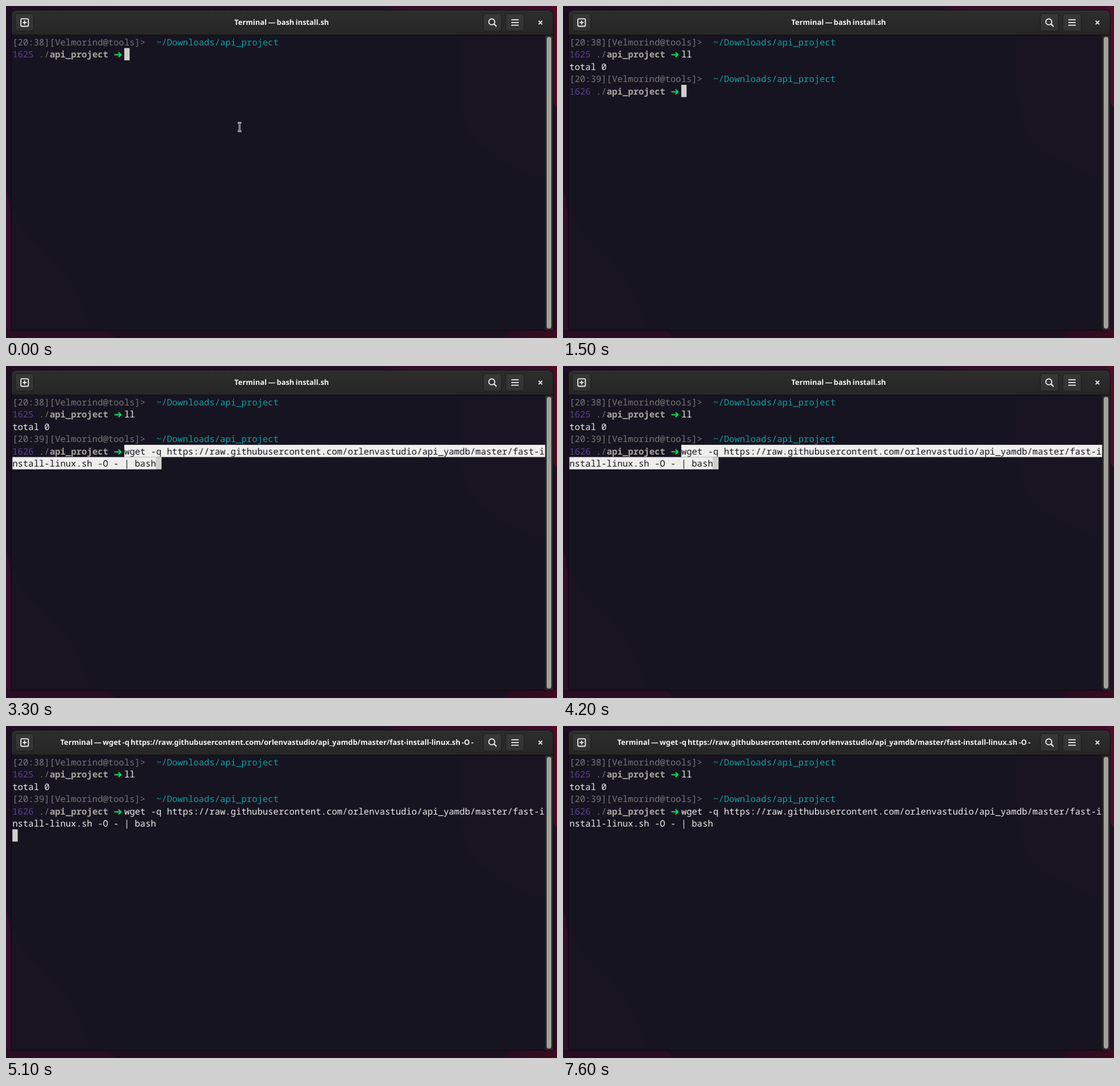
Write an HTML page that moves like this. It is 964 px wide and 581 px high and loops after 8000 ms.

```html
<!DOCTYPE html>
<html lang="en">
<head>
<meta charset="utf-8">
<title>Terminal</title>
<style>
  html, body { margin: 0; width: 100%; height: 100%; overflow: hidden; background: #190f1f; }
  svg { display: block; width: 964px; height: 581px; }
  text { white-space: pre; text-rendering: geometricPrecision; }
  #screen text { font: 15.53px "Noto Sans Mono", "DejaVu Sans Mono", monospace; }
  #screen text.bold { font-weight: bold; }
  #screen text.arrow { font: bold 18.3px "DejaVu Sans", sans-serif; }
  #title { font: bold 12.87px "Noto Sans", "Open Sans", sans-serif; word-spacing: -1.1px; }
</style>
</head>
<body>
<svg viewBox="0 0 964 581">
  <defs>
    <linearGradient id="header" x2="0" y2="1">
      <stop stop-color="#2d2d2d"/><stop offset="1" stop-color="#262626"/>
    </linearGradient>
    <linearGradient id="button" x2="0" y2="1">
      <stop stop-color="#383838"/><stop offset="1" stop-color="#323232"/>
    </linearGradient>
    <linearGradient id="topEdge">
      <stop stop-color="#1f0e22"/><stop offset=".68" stop-color="#210f24"/>
      <stop offset=".72" stop-color="#340e26"/><stop offset="1" stop-color="#3c0d26"/>
    </linearGradient>
    <linearGradient id="bottomEdge">
      <stop stop-color="#260c1e"/><stop offset="1" stop-color="#3c0b20"/>
    </linearGradient>
  </defs>

  <!-- wallpaper -->
  <rect width="964" height="581" fill="#190f1f"/>
  <rect width="964" height="10" fill="url(#topEdge)"/>
  <rect x="955" width="9" height="581" fill="#270e21"/>
  <path d="M955 0H964V178L955 166Z" fill="#4e0c23"/>
  <path d="M0 320Q14 350 14 581H0Z" fill="#330e27"/>
  <path d="M0 566H180L192 581H0Z" fill="#290d22"/>
  <path d="M870 581L880 566H964V581Z" fill="url(#bottomEdge)"/>

  <!-- window -->
  <path d="M9.500 567.500V16Q9.500 7.500 18 7.500H949Q957.500 7.500 957.500 16V567.500Z" fill="#171421" stroke="#0c090f"/>
  <path d="M795 52Q788 190 812 224Q850 270 943 303V52Z" fill="#191421"/>
  <path d="M10 352Q25 395 66 428Q128 480 148 567H10Z" fill="#181421"/>
  <path d="M10 51V16Q10 8 18 8H949Q957 8 957 16V51Z" fill="url(#header)"/>
  <path d="M17 8.500H950" stroke="#383838"/>
  <path d="M10 50.800H957" stroke="#0c0c0d"/>
  <rect x="943.500" y="51.500" width="13.500" height="515.500" fill="#2a2c2c"/>
  <rect x="946" y="54" width="8" height="510.500" rx="4" fill="#a3a19d"/>

  <!-- header buttons -->
  <g fill="url(#button)" stroke="#1a1a1a">
    <rect x="16.500" y="13.500" width="32" height="30.500" rx="4.500"/>
    <rect x="835" y="13.500" width="32" height="30.500" rx="4.500"/>
    <rect x="874.500" y="13.500" width="32" height="30.500" rx="4.500"/>
  </g>
  <g fill="none" stroke="#f0f0ee" stroke-width="1.800">
    <rect x="26" y="22.300" width="13.200" height="13.200" rx="2"/>
    <path d="M32.600 25.300V32.500M29 28.900H36.200"/>
    <circle cx="849.900" cy="27.700" r="5.200"/>
    <path d="M853.600 31.400L858.200 36" stroke-width="2.300"/>
    <path d="M884 24.100H897M884 28.900H897M884 33.700H897"/>
    <path d="M931.900 25.900L938.100 32.100M938.100 25.900L931.900 32.100" stroke-width="2"/>
  </g>
  <text id="title" y="33.300" fill="#f4f4f2"></text>

  <g id="screen"></g>
  <g id="pointer" fill="none">
    <path d="M405.500 204.500H407.500L408.700 205.500L409.900 204.500H411.900M408.700 205.500V218M405.500 219H407.500L408.700 218L409.900 219H411.900" stroke="#f2f2f2" stroke-width="2.800"/>
    <path d="M405.700 204.500H407.500L408.700 205.500L409.900 204.500H411.700M408.700 205.500V218M405.700 219H407.500L408.700 218L409.900 219H411.700" stroke="#17171b" stroke-width="1"/>
  </g>
</svg>
<script>
const LOOP = 8000;
const LEFT = 11.2, TOP = 52.2, CELL_W = 9.32, CELL_H = 21.436, ASCENT = 16.8;
const WHITE = "#eeeeec", DARK = "#171421", DIM = "#777577", CURSOR = "#d0cfcc";
const PROMPT_END = 21;
const SCRIPT = "wget -q https://raw.githubusercontent.com/orlenvastudio/api_yamdb/master/fast-install-linux.sh -O -";
const COMMAND = SCRIPT + " | bash";
const WRAP = 100 - PROMPT_END;

const TITLES = [
  { text: "Terminal — bash install.sh", x: 399.5 },
  { text: "Terminal — " + SCRIPT, x: 95 }
];

// Cursor positions by time; each one restarts the blink.
const CURSOR_STOPS = [
  { at: 0, col: 21, row: 1, flips: [200, 800] },
  { at: 900, col: 22, row: 1, flips: [] },
  { at: 1100, col: 23, row: 1, flips: [] },
  { at: 1500, col: 21, row: 4, flips: [2100, 2800] },
  { at: 3300, col: 27, row: 5, flips: [3600, 4200] },
  { at: 4600, col: 0, row: 6, flips: [5200, 5800, 6400, 7000, 7600] }
];

const screen = document.getElementById("screen");
const title = document.getElementById("title");
const pointer = document.getElementById("pointer");

function add(tag, attrs, parent = screen) {
  const node = document.createElementNS("http://www.w3.org/2000/svg", tag);
  for (const key in attrs) node.setAttribute(key, attrs[key]);
  return parent.appendChild(node);
}

const colX = col => LEFT + col * CELL_W;
const rowY = row => TOP + row * CELL_H;

function write(col, row, text, fill, style = "", parent = screen) {
  const node = add("text", { x: colX(col), y: rowY(row) + ASCENT, fill, class: style }, parent);
  node.textContent = text;
  return node;
}

function block(col, row, count, fill, parent = screen) {
  return add("rect", {
    x: colX(col), y: rowY(row), width: count * CELL_W, height: CELL_H, fill
  }, parent);
}

function prompt(row, clock, number, parent) {
  write(0, row, `[${clock}][Velmorind@tools]>`, DIM, "", parent);
  write(27, row, "~/Downloads/api_project", "#0da0a3", "", parent);
  write(0, row + 1, number, "#5c3f90", "", parent);
  write(5, row + 1, "./", DIM, "", parent);
  write(7, row + 1, "api_project", "#aaa7a1", "bold", parent);
  write(19, row + 1, "➜", "#08d95c", "arrow", parent).setAttribute("dy", 1);
}

function command(fill, parent) {
  write(PROMPT_END, 4, COMMAND.slice(0, WRAP), fill, "", parent);
  write(0, 5, COMMAND.slice(WRAP), fill, "", parent);
}

const show = (node, on) => node.setAttribute("visibility", on ? "visible" : "hidden");

prompt(0, "20:38", "1625", screen);
const typed = write(PROMPT_END, 1, "", WHITE);

const listing = add("g", {});
write(0, 2, "total 0", WHITE, "", listing);
prompt(3, "20:39", "1626", listing);

const pasted = add("g", {});
block(PROMPT_END, 4, WRAP, WHITE, pasted);
block(0, 5, COMMAND.length - WRAP, WHITE, pasted);
command(DARK, pasted);

const running = add("g", {});
command(WHITE, running);

const cursor = block(0, 0, 1, CURSOR);

function render(t) {
  const heading = TITLES[t < 5100 ? 0 : 1];
  if (title.textContent !== heading.text) {
    title.textContent = heading.text;
    title.setAttribute("x", heading.x);
  }
  typed.textContent = t < 900 ? "" : t < 1100 ? "l" : "ll";
  show(pointer, t < 900);
  show(listing, t >= 1500);
  show(pasted, t >= 3300 && t < 4600);
  show(running, t >= 4600);

  const stop = CURSOR_STOPS.filter(s => s.at <= t).pop();
  cursor.setAttribute("x", colX(stop.col));
  cursor.setAttribute("y", rowY(stop.row));
  show(cursor, stop.flips.filter(f => f <= t).length % 2 === 0);
}

const start = performance.now();
function tick() {
  render((performance.now() - start) % LOOP);
  requestAnimationFrame(tick);
}
render(0);
requestAnimationFrame(tick);
</script>
</body>
</html>
```
